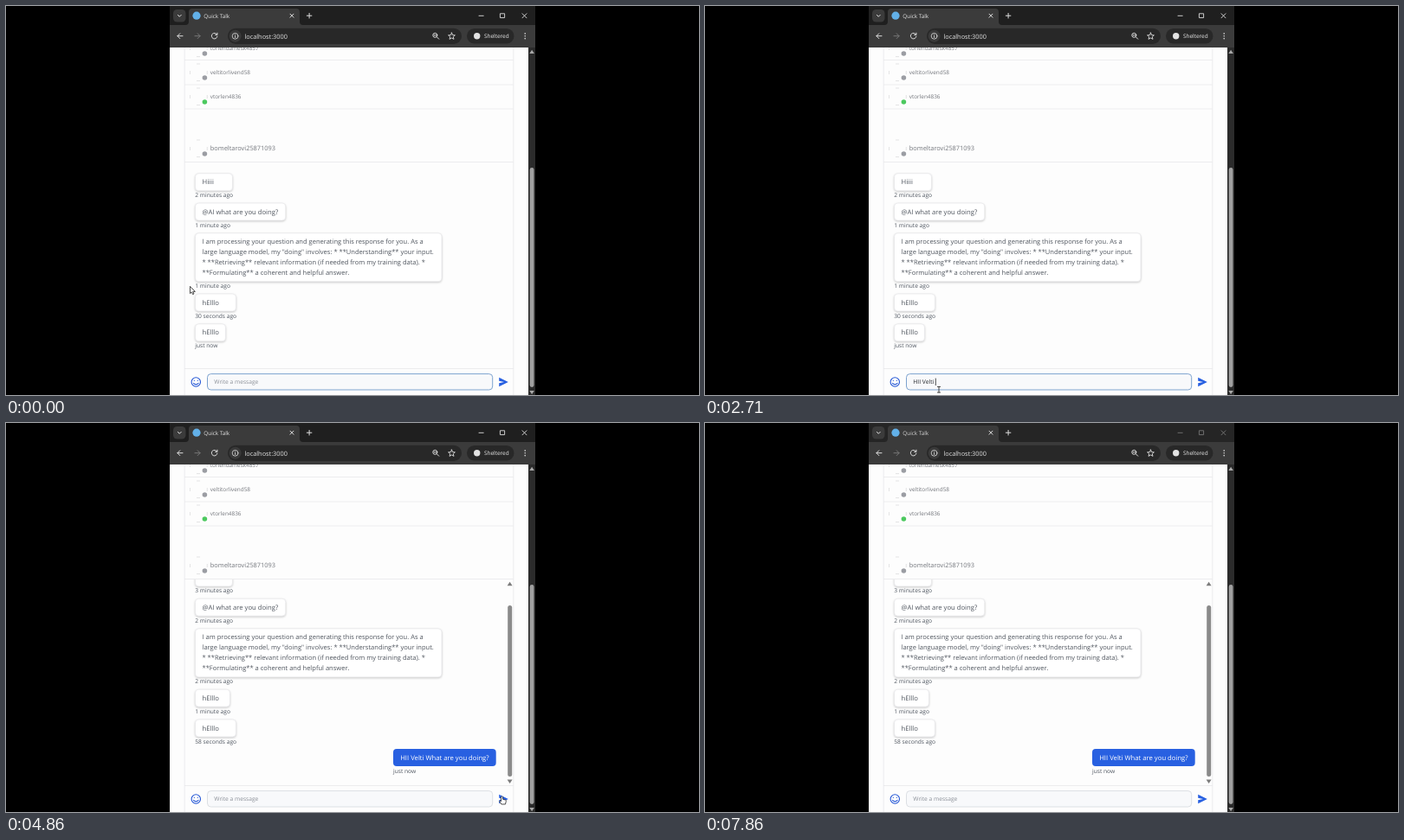
Recreate the animation shown at these times as an HTML page. Size 800 by 450 pixels, loop 8000 ms.

```html
<!DOCTYPE html>
<html lang="en">
<head>
<meta charset="utf-8">
<title>Chat window</title>
<style>
  html, body { margin: 0; width: 100%; height: 100%; overflow: hidden; background: #000; }
  svg { display: block; width: 800px; height: 450px; }
  text { font-family: "Open Sans", "Noto Sans", sans-serif; text-rendering: geometricPrecision; white-space: pre; }
  .line { fill: none; stroke-linecap: round; stroke-linejoin: round; }
  .bubble { fill: #fff; stroke: #e6e6e8; stroke-width: .7; filter: drop-shadow(0 1px 1px #0003); }
</style>
</head>
<body>
<svg viewBox="0 0 800 450">
  <defs>
    <clipPath id="pane"><rect x="206" y="181" width="380" height="238"/></clipPath>
    <clipPath id="window"><rect x="189" width="422" height="450"/></clipPath>
  </defs>
  <g clip-path="url(#window)">
    <rect x="189" y="48" width="414" height="402" fill="#fdfdfd"/>
    <g id="people"></g>
    <path d="M206 62.5H586M206 91H586M206 119H586M206 180.5H586M206 419.5H586M206.2 48V450M585.8 48V450" stroke="#e9e9eb" stroke-width=".8"/>
    <g clip-path="url(#pane)"><g id="messages"></g></g>

    <g id="sent">
      <rect x="447" y="377" width="118.7" height="20" rx="4" fill="#2860e1"/>
      <text x="455.2" y="389.9" font-size="7.7" fill="#fff">HII Velti What are you doing?</text>
      <text x="447" y="404.6" font-size="6.65" fill="#4f5660">just now</text>
      <rect x="579.2" y="211" width="5" height="198" rx="2.5" fill="#8a8a8a"/>
      <path d="M578.6 188.2h6l-3-4.4zM578.6 412.6h6l-3 4.4z" fill="#7c7c7c"/>
    </g>

    <rect id="field" x="232.5" y="425.6" width="329.2" height="18.4" rx="4"/>
    <text id="entry" x="240.3" y="437.3"></text>
    <path id="caret" stroke="#222" stroke-width=".8"/>
    <g class="line" stroke="#2557d6" stroke-width="1.1">
      <circle cx="219.3" cy="435" r="5.2"/>
      <path d="M216.5 436.3q2.8 3.2 5.6 0M217.3 433.3v.2M221.3 433.3v.2"/>
    </g>
    <path d="M569.2 429.7L579.8 435L569.2 440.3V436.3L575 435L569.2 433.7Z" fill="#2860e1"/>

    <rect x="603" y="48" width="8" height="402" fill="#2b2b2b"/>
    <rect x="604.7" y="187" width="4.8" height="254" rx="2.4" fill="#a0a0a0"/>
    <path d="M604.3 55h5.6l-2.8-4.2zM604.3 445h5.6l-2.8 4.2z" fill="#a8a8a8"/>

    <rect id="frame" x="189" width="422" height="24"/>
    <path d="M189 22H207Q211 22 211 18V7Q211 3 215 3H335Q339 3 339 7V18Q339 22 343 22H611V48H189Z" fill="#3b3b3b"/>
    <rect x="193" y="4" width="14.5" height="14.5" rx="4.5" fill="#3b3b3b"/>
    <circle cx="220" cy="11.2" r="4.6" fill="#62b0e8"/>
    <text id="title" x="228.3" y="13.6" font-size="6.35">Quick Talk</text>
    <rect x="256" y="25.7" width="270" height="18.3" rx="9.1" fill="#282828"/>
    <circle cx="264.6" cy="34.8" r="7" fill="#3a3a3a"/>
    <rect x="532" y="26" width="54.5" height="17.5" rx="8.7" fill="#282828"/>
    <circle cx="543.7" cy="34.7" r="3.7" fill="#e3e3e3"/>
    <text x="275.4" y="37.5" font-size="7.35" fill="#e3e3e3">localhost:3000</text>
    <text x="552" y="37.1" font-size="6.45" fill="#e8e8e8">Sheltered</text>
    <g class="line" stroke="#dedede" stroke-width="1">
      <path d="M198.4 10.4l1.9 1.9l1.9-1.9"/>
      <path d="M328 9.2l4 4m0-4l-4 4M347.3 11.2h5.6m-2.8-2.8v5.6"/>
      <path d="M204 34.7h-6m2.8-2.9l-2.9 2.9l2.9 2.9"/>
      <path d="M218 34.7h6m-2.8-2.9l2.9 2.9l-2.9 2.9" stroke="#777"/>
      <path d="M243.4 32.8A3.3 3.3 0 1 0 243.9 35.2M243.9 31.2v2.2h-2.2"/>
      <circle cx="264.6" cy="34.8" r="3.4" stroke-width=".8"/>
      <path d="M264.6 34.6v1.8M264.6 33v.1" stroke-width=".9"/>
      <circle cx="495.3" cy="33.8" r="2.5"/>
      <path d="M497.3 35.8l2.4 2.4M494.2 33.8h2.2"/>
      <path d="M514.5 31l1.1 2.6l2.8.2l-2.1 1.8l.7 2.8l-2.5-1.5l-2.5 1.5l.7-2.8l-2.1-1.8l2.8-.2z" stroke-width=".9"/>
      <path d="M599.2 31.8v.1M599.2 34.7v.1M599.2 37.6v.1" stroke-width="1.5"/>
      <path id="controls" d="M546 11.3h5.2M570.8 8.8h4.8v4.8h-4.8zM596 8.8l5 5m0-5l-5 5" stroke-width=".9"/>
    </g>

    <g id="pointer">
      <path id="arrow" d="M0 0V8.3L1.9 6.6L3.1 9.3L4.5 8.7L3.3 6.1H5.9Z" fill="#fff" stroke="#222" stroke-width=".8"/>
      <path id="beam" class="line" d="M-1.6 -3.3H1.6M0 -3.3V3.3M-1.6 3.3H1.6" stroke="#333" stroke-width=".9"/>
      <path id="hand" d="M-1 .6Q0-.8 1 .6V3.2L4.3 4.1Q5 4.4 4.8 5.4L4 9H-.6L-3 5.6Q-2.6 4.5-1 5.6Z" fill="#fff" stroke="#222" stroke-width=".8"/>
    </g>
  </g>
</svg>
<script>
const $ = id => document.getElementById(id);
const label = (x, y, size, color, str) =>
  `<text x="${x}" y="${y}" font-size="${size}" fill="${color}">${str}</text>`;

const people = [
  [49, "torlendamesk4857", 6.4, "#9b9da3"],
  [77, "veltitorlivend58", 6.4, "#9b9da3"],
  [105, "vtorlen4836", 6.4, "#4cc95f"],
  [165, "bomeltarovi25871093", 7.4, "#9b9da3"]
];
$("people").innerHTML = people.map(([y, name, size, dot]) =>
  `<path d="M212.5 ${y - 2}v4M232.3 ${y - 2}v4M220 ${y - 10}h4M220 ${y + 9.6}h4" stroke="#d8d8da" stroke-width=".7"/>
   <circle cx="229.4" cy="${y + 6}" r="2.8" fill="${dot}"/>` +
  label(235.8, y + 2.2, size, "#73767c", name)).join("");

// top, height, lines, then [width, age] before and after sending
const chat = [
  [193.7, 20, ["Hiiii"], [43, "2 minutes ago"], [43, "3 minutes ago"]],
  [228, 20, ["@AI what are you doing?"], [104.3, "1 minute ago"], [104.3, "2 minutes ago"]],
  [262.7, 56, [
    "I am processing your question and generating this response for you. As a",
    "large language model, my \"doing\" involves: * **Understanding** your input.",
    "* **Retrieving** relevant information (if needed from my training data). *",
    "**Formulating** a coherent and helpful answer."
  ], [284.5, "1 minute ago"], [284.5, "2 minutes ago"]],
  [333, 20, ["hElllo"], [47, "30 seconds ago"], [40, "1 minute ago"]],
  [367.8, 20, ["hElllo"], [35, "just now"], [47, "58 seconds ago"]]
];

function drawChat(sent) {
  $("messages").setAttribute("transform", `translate(0 ${sent ? -24.8 : 0})`);
  $("messages").innerHTML = chat.map(([y, h, lines, before, after]) => {
    const [w, age] = sent ? after : before;
    const size = lines.length > 1 ? 7.54 : 7.68;
    return `<rect class="bubble" x="218.5" y="${y}" width="${w}" height="${h}" rx="4"/>` +
      lines.map((s, i) => label(226.5, y + 12.6 + i * 12, size, "#50565f", s)).join("") +
      label(218.3, y + h + 7.6, 6.65, "#4f5660", age);
  }).join("");
}

// linear interpolation through rows of [step, ...values]
function along(keys, n) {
  const i = keys.findIndex(k => k[0] >= n);
  if (i < 0) return keys.at(-1).slice(1);
  if (i === 0) return keys[0].slice(1);
  const a = keys[i - 1], b = keys[i], u = (n - a[0]) / (b[0] - a[0]);
  return a.slice(1).map((v, j) => v + (b[j + 1] - v) * u);
}

const path = [[0, 212.5, 324.3], [2, 224, 344], [6, 277, 427], [8, 286, 438], [12, 270, 443.7],
  [29, 270, 443.7], [31, 390, 428], [33, 532, 401.5], [34, 572.5, 432], [35, 572.5, 432], [36, 598, 439]];
const typed = [[12, 0], [15, 3], [16, 3], [19, 10], [28, 29]];
const message = "HII Velti What are you doing?";
const show = (id, on) => $(id).setAttribute("visibility", on ? "visible" : "hidden");

function draw(n) {
  const sent = n >= 34;
  drawChat(sent);
  show("sent", sent);

  const field = $("field"), entry = $("entry");
  field.setAttribute("fill", "#f8f9fb");
  field.setAttribute("stroke", sent ? "#d5d8de" : "#7da3cf");
  field.setAttribute("stroke-width", sent ? .8 : 1);
  const count = sent ? 0 : Math.floor(along(typed, n)[0] + .001);
  entry.textContent = count ? message.slice(0, count) : "Write a message";
  entry.setAttribute("font-size", count ? 6.74 : 6.65);
  entry.setAttribute("fill", count ? "#25282d" : "#8b9098");
  show("caret", count > 0);
  $("caret").setAttribute("d", `M${240.6 + entry.getComputedTextLength()} 430.6V439`);

  const [x, y] = along(path, n);
  $("pointer").setAttribute("transform", `translate(${x} ${y})`);
  show("arrow", n <= 8 || n >= 31 && n <= 33);
  show("beam", n >= 9 && n <= 30);
  show("hand", n >= 34 && n <= 36);

  $("controls").setAttribute("stroke", n >= 38 ? "#777" : "#dedede");
  $("frame").setAttribute("fill", n >= 40 ? "#252525" : "#1f1f1f");
  $("title").setAttribute("fill", n >= 40 ? "#d2d2d2" : "#e3e3e3");
}

let last = -1;
const start = performance.now();
function tick() {
  const n = Math.floor(((performance.now() - start) % 8000 + 5) * 7 / 1000) % 56;
  if (n !== last) draw(last = n);
  requestAnimationFrame(tick);
}
tick();
</script>
</body>
</html>
```
